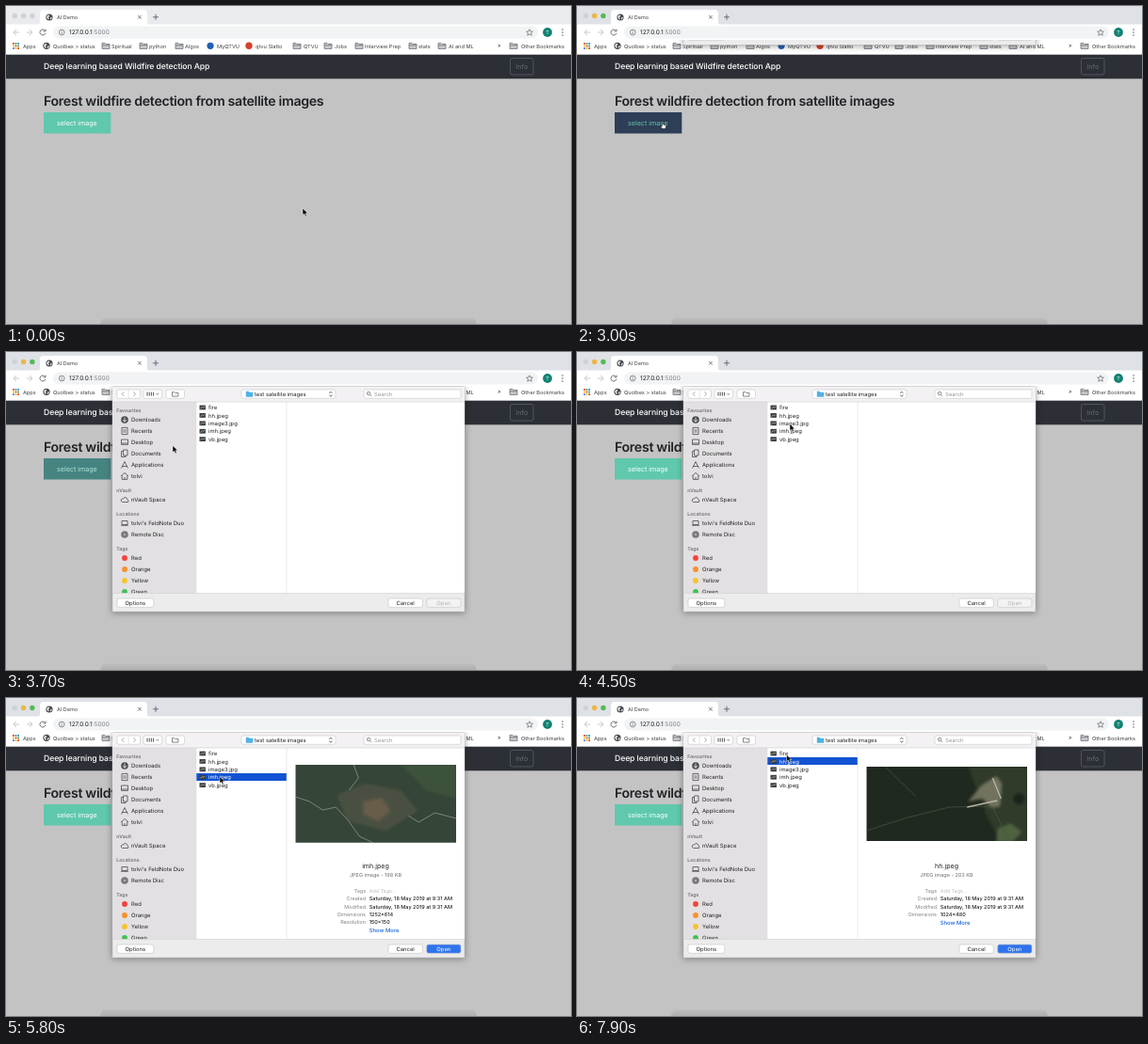
Write an HTML page that moves like this. It is 600 by 338 pixels and loops after 8 s.

```html
<!DOCTYPE html>
<html lang="en">
<head>
<meta charset="utf-8">
<title>Wildfire detection demo</title>
<style>
  html, body { margin: 0; width: 100%; height: 100%; overflow: hidden; background: #c4c3c4; }
  svg { display: block; width: 600px; height: 338px; }
  text { font-family: Inter, Roboto, "Liberation Sans", sans-serif; text-rendering: geometricPrecision; white-space: pre; }
  #sheet { filter: drop-shadow(0 1.5px 3.5px rgba(0, 0, 0, .36)); }
  .soft { filter: blur(1.6px); }
</style>
</head>
<body>
<svg id="stage" viewBox="0 0 600 338"></svg>
<script>
const LOOP = 8000, DARK = '#3c4043', INK = '#222', GREY = '#808080', ICON = '#4c4b4d';

// Drawing helpers, each returning SVG markup
const text = (x, y, s, size, fill = INK, more = '') =>
  `<text x="${x}" y="${y}" font-size="${size}" fill="${fill}" ${more}>${s}</text>`;
const rect = (x, y, w, h, fill, more = '') =>
  `<rect x="${x}" y="${y}" width="${w}" height="${h}" fill="${fill}" ${more}/>`;
const dot = (x, y, r, fill, more = '') => `<circle cx="${x}" cy="${y}" r="${r}" fill="${fill}" ${more}/>`;
const line = (d, color, w = .8, more = '') =>
  `<path d="${d}" fill="none" stroke="${color}" stroke-width="${w}" ${more}/>`;
const shape = (d, fill, more = '') => `<path d="${d}" fill="${fill}" ${more}/>`;
const group = (id, body, more = '') => `<g id="${id}" ${more}>${body}</g>`;
const MID = 'text-anchor="middle"', END = 'text-anchor="end"';

const folder = (x, y, c = '#6b6f74') =>
  shape(`M${x} ${y - 3}h3l1 1h4v5h-8z`, '#c9cbce') +
  line(`M${x} ${y - 3}h3l1 1h4v5h-8zM${x} ${y - .6}h8`, c, .8);
const globe = (x, y) => dot(x, y, 3.6, '#46494d') +
  shape(`M${x - 2.6} ${y - 1.4}l2-1.2 1 1.4-1.6 1.2 1 1.2-.8 1.4-1.6-2zM${x + 1} ${y + .4}l1.8-.6-.4 1.8-1.4 1z`, '#e8eaed');

function browser() {
  const bookmarks = [
    [18, 'Apps'], [50, 'Quolbex &gt; status'], [112, 'Spiritual', 102], [152, 'python', 142], [190, 'Algos', 180],
    [224, 'MyQTVU'], [265, 'qtvu Slatto'], [316, 'QTVU', 305], [349, 'Jobs', 338],
    [381, 'Interview Prep', 371], [438, 'stats', 428], [470, 'AI and ML', 459], [547, 'Other Bookmarks', 535]];
  const colors = ['#ea4335', '#34a853', '#4285f4', '#fbbc05'];
  let s = `<rect id="strip" width="600" height="20"/>`;
  for (let i = 0; i < 3; i++) s += `<circle class="light" cx="${9.3 + i * 9.3}" cy="10.5" r="2.7"/>`;
  s += shape('M33 20q3 0 3-3V8q0-4 4-4h106q4 0 4 4v9q0 3 3 3z', '#fff') + globe(46, 12) +
    text(54, 14, 'AI Demo', 5.5, DARK) +
    line('M140 10l3.6 3.6m0-3.6l-3.6 3.6', '#5f6368', .8) + line('M156 11.8h6m-3-3v6', '#5f6368', .9);
  s += rect(0, 19.5, 600, 32, '#fff') + rect(50, 21.5, 515, 13, '#f1f3f4', 'rx="6.5"') +
    line('M14 28H8m3-3l-3 3 3 3M22 28h6m-3-3l3 3-3 3', '#c1c4c8', .9) +
    line('M41.4 26.2a3 3 0 1 0 .5 2.6M42 24.6v2.3h-2.4', '#5f6368', .9) +
    line('M59.2 27.6v2.2m0-3.8v.8M56.3 28a2.9 2.9 0 1 0 5.8 0a2.9 2.9 0 1 0-5.8 0', '#5f6368', .7) +
    text(67, 30.2, '127.0.0.1<tspan fill="#80868b">:5000</tspan>', 6.5) +
    line('M556 24.8l1 2.2 2.4.2-1.8 1.6.6 2.4-2.2-1.3-2.2 1.3.6-2.4-1.8-1.6 2.4-.2z', '#5f6368', .7) +
    dot(575, 28, 4.9, '#128272') + text(575, 30, 'T', 5.4, '#fff', MID);
  for (const y of [25, 28, 31]) s += dot(591, y, .8, '#5f6368');
  for (let i = 0; i < 9; i++) s += rect(7 + i % 3 * 2.6, 39 + (i / 3 | 0) * 2.6, 1.8, 1.8, colors[i % 4]);
  s += globe(43, 42.3) + dot(217, 42.3, 3.6, '#1f62b5') + dot(258, 42.3, 3.7, '#d6402c');
  for (const [x, name, icon] of bookmarks)
    s += text(x, 44.5, name, 5.6, DARK) + (icon ? folder(icon, 42.4) : '');
  return s + text(522, 44.3, '»', 6, DARK);
}

function page() {
  return rect(0, 51, 600, 287, '#c4c3c4') +
    text(40, 67.4, 'Deep learning based Wildfire detection App', 8.65, '#fff', 'font-weight="500" letter-spacing="-.08"') +
    rect(535.5, 55.5, 24.5, 17.5, 'none', 'rx="2" stroke="#596067" stroke-width=".8"') +
    text(547.8, 67, 'Info', 7.2, '#656c73', MID) +
    text(40, 106.3, 'Forest wildfire detection from satellite images', 14.15, '#1f2225', 'font-weight="600" letter-spacing="-.3"') +
    '<rect id="button" x="40" y="113" width="71.3" height="22.5"/>' +
    text(54, 127.2, 'select image', 7.15, '#fff', 'id="label"') +
    shape('M100 338q1-7 8-7h384q7 0 8 7z', 'url(#dock)');
}

function sidebar() {
  const heads = [['Favourites', 63.5], ['nVault', 148.8], ['Locations', 173.5], ['Tags', 210.5]];
  const items = [['Downloads', 72], ['Recents', 84], ['Desktop', 96], ['Documents', 108], ['Applications', 120],
    ['tolvi', 132], ['nVault Space', 157], ["tolvi's FeldNote Duo", 182], ['Remote Disc', 194],
    ['Red', 219, '#f5413a'], ['Orange', 231, '#f7902a'], ['Yellow', 243, '#f6c32f'], ['Green', 255, '#41c150']];
  const icons = [
    'M126 69.6v4.6m-2-2l2 2 2-2', 'M123 80.4h6v7.2h-6zM124.4 83h3.2m-3.2 2h3.2', 'M122.5 93h7v5.4h-7zM122.5 97h7',
    'M124.5 104h4.5v6h-4.5zM124.5 105.5h-2v6h4.5V110', 'M126 116.5l-3.5 7m3.5-7l3.5 7m-6.5-2h6',
    'M122 132l4-3.6 4 3.6M123.2 131.4v4h5.6v-4M126 135.4v-2.4',
    'M123.5 159.5q-2-1-1-2.8 1-1 2-.6 1-2.4 3.2-1.2 1.2.6 1.2 2 2 1 .6 2.6z',
    'M123 179.5h6v4h-6zM122 184.3h8', 'M125 194h2'];
  let s = rect(113, 53, 89, 203.5, '#e2e0e2');
  for (const [name, y] of heads) s += text(117.3, y, name, 5.15, '#737173', 'font-weight="600"');
  items.forEach(([name, y, tag], i) => {
    s += text(133, y + 2.1, name, 5.9);
    if (tag) return s += dot(126, y, 2.9, tag);
    const filled = i == 0 || i == 8;
    if (filled) s += dot(126, y, 3.8, i ? '#7b797b' : ICON);
    s += line(icons[i], filled ? '#fff' : ICON, .8);
  });
  return s;
}

const files = ['fire', 'hh.jpeg', 'image3.jpg', 'imh.jpeg', 'vb.jpeg'];
const rowY = i => 59 + i * 8.4;

function preview(id, name, size, [x, y, w, h], photo, facts) {
  let s = `<svg x="${x}" y="${y}" width="${w}" height="${h}">${photo}</svg>` +
    text(392.5, 180.6, name, 7.1, INK, MID) +
    text(392.5, 190, `JPEG image - ${size} KB`, 5.5, GREY, MID + ' font-weight="500"') +
    text(382, 207.2, 'Tags', 5.4, GREY, END) + text(385.7, 207.2, 'Add Tags…', 5.4, '#bdbdbd');
  facts.forEach(([key, value], i) => {
    const y = 215.4 + i * 8.3;
    s += text(382, y, key, 5.45, GREY, END) + text(385.7, y, value, 5.53, INK, 'font-weight="500"');
  });
  s += text(385.7, 215.7 + facts.length * 8.3, 'Show More', 5.9, '#1462d6', 'font-weight="500"');
  return group(id, s, 'class="preview" clip-path="url(#pane)"');
}

// Soft satellite views: a ground colour with a few blurred patches
const view = (ground, patches) => rect(0, 0, 171, 97, ground) + `<g class="soft">${patches}</g>`;
const photos = {
  image3: view('#2e3834',
    shape('M0 0h62l-24 24-38 22z', '#3a4543') + shape('M84 97l64-55v55z', '#3f4236') +
    shape('M0 42L41 27 84 7l28-5 18 4 9 12-18 16-40 21-26 20-18 22H0z', 'url(#smoke)') +
    shape('M6 62l46-26 42-18-28 26-42 36z', '#c0c1bf', 'opacity=".5"') +
    line('M85 47l9-10 3-14 10-6m-9 20l17-9 8-11', '#cf6248', 1.6)),
  imh: view('#354538',
    shape('M44 32l30-12 38 7 18 22-34 21-40-10z', '#545646', 'opacity=".7"') +
    shape('M72 39l20-4 9 14-13 11-16-8z', '#80684f', 'opacity=".55"') +
    shape('M112 0h59v36l-31-8z', '#3d523b')) +
    line('M0 34l15 5 14 9 14-3 13 14 12 17 15 7M62 0l5 14-10 13M171 57l-23-6-17 10-11-7', '#8f978b', .8),
  hh: view('#20291f',
    shape('M108 0h63v80h-28l-15-28z', '#303b2a') +
    shape('M122 20l16-10 6 8-2 24-9 2-9-10-16 3z', '#87866f', 'opacity=".75"') +
    shape('M139 66l14-6 12 9-10 11h-17z', '#4e6240') + dot(162, 34, 6, '#1b241b')) +
    line('M0 68l44-14 44-11 46-1M134 42l18 38M20 0l32 31', '#4c5645', .7) +
    line('M107 43l32-7m-5-24l9 22', '#b9b8a4', 1.3),
};

function sheet() {
  const pill = (x, w, fill = '#fff') =>
    rect(x, 40, w, 9.3, fill, 'rx="2" stroke="#c9c7c9" stroke-width=".6"');
  const saved = date => [['Created', date], ['Modified', date]];
  const may = saved('Saturday, 18 May 2019 at 9:31 AM');
  let s = rect(113, 37, 374, 239, '#ececec', 'stroke="#b5b3b5" stroke-width=".5"') +
    rect(113, 37, 374, 16, '#f3f1f3') + pill(118, 24.5) + pill(146, 19.5) + pill(170, 19.5) + pill(250, 100) + pill(380, 103) +
    line('M130.2 40v9.3', '#d5d3d5', .6) +
    line('M125.2 42.4l-2 2.2 2 2.2M135.5 42.4l2 2.2-2 2.2', '#929092', .8) +
    line('M150 42.6v4m2.2-4v4m2.2-4v4m2.2-4v4', '#555', 1) + line('M159.4 44l1.3 1.4 1.3-1.4', '#555', .7) +
    line('M176.5 42.6h2.4l.8.8h3.2v3.7h-6.4z', '#555', .7) +
    shape('M254.8 41.7h2.8l.8 1h3.8v5h-7.4z', '#4fb1e6') +
    text(264, 46.8, 'test satellite images', 5.85) +
    line('M343.3 43.8l1.5-1.7 1.5 1.7m-3 1.8l1.5 1.7 1.5-1.7', '#444', .8) +
    line('M383.3 44a1.8 1.8 0 1 0 3.6 0a1.8 1.8 0 1 0-3.6 0m3.2 1.4l1.7 1.7', '#666', .7) +
    text(391, 46.8, 'Search', 5.9, '#999');
  s += group('side', sidebar(), 'clip-path="url(#pane)"') + rect(202, 53, 285, 203.5, '#fff') +
    line('M202 53v203.5M298 53v203.5', '#dedcde', .6) + line('M113 53h374M113 256.5h374', '#d0ced0', .6);
  s += '<rect id="row" x="202.3" width="95.5" height="8" fill="#1153d2"/>';
  files.forEach((name, i) => {
    const y = rowY(i);
    s += rect(205.5, y - 2.4, 6.4, 4.8, '#3a3f3c') + line(`M206.5 ${y + 1}l2-1.5 1.4.7 1.3-1.4`, '#c7cac7', .7) +
      text(215, y + 2.1, name, 5.9, INK, 'class="file"');
  });
  s += preview('p2', 'image3.jpg', 124, [319, 64, 147.5, 97], photos.image3, [
      ['Created', 'Tuesday, 30 April 2019 at 7:01 PM'], ['Modified', 'Sunday, 21 April 2019 at 10:32 PM'],
      ['Last opened', 'Sunday, 5 May 2019 at 11:10 PM'], ['Dimensions', '750×500'], ['Resolution', '72×72']]) +
    preview('p3', 'imh.jpeg', 198, [307.3, 71, 170.7, 82.8], photos.imh,
      [...may, ['Dimensions', '1252×614'], ['Resolution', '150×150']]) +
    preview('p1', 'hh.jpeg', 203, [307.3, 73, 170.7, 79], photos.hh, [...may, ['Dimensions', '1024×480']]);
  for (const [name, x, w] of [['Options', 118, 38.8], ['Cancel', 406, 36.3], ['Open', 446.7, 36.3]])
    s += rect(x, 262, w, 9.3, '#fff', `id="b${name}" rx="2" stroke="#c4c2c4" stroke-width=".6"`) +
      text(x + w / 2, 268.8, name, 5.9, INK, `${MID} id="t${name}"`);
  return s;
}

const $ = id => document.getElementById(id);
$('stage').innerHTML = `<defs>
  <clipPath id="below"><rect x="90" y="36" width="420" height="302"/></clipPath>
  <clipPath id="pane"><rect x="113" y="53" width="374" height="203.2"/></clipPath>
  <linearGradient id="dock" x2="0" y2="1"><stop stop-color="#bfbebf"/><stop offset="1" stop-color="#b1b0b1"/></linearGradient>
  <linearGradient id="smoke" x1="1" y1="0" x2="0" y2="1"><stop stop-color="#8c8480"/><stop offset=".45" stop-color="#aaaaa8"/><stop offset="1" stop-color="#6c7270"/></linearGradient>
  </defs>` + page() + browser() + rect(0, 51.5, 600, 25.8, '#2c2f35', 'id="navbar"') +
  `<g id="sheetClip" clip-path="url(#below)">${group('sheet', sheet())}</g>` +
  group('arrow', shape('M0 0v7.2l1.7-1.5 1.2 2.6 1.3-.5-1.1-2.6h2.3z', '#000', 'stroke="#fff" stroke-width=".5"')) +
  group('hand', shape('M-.7.2q.8-.8 1.4 0v2.3l2.4.6q.8.3.6 1.2L3 7H-.3l-2-2.5q0-1 1.6 0z', '#fff', 'stroke="#111" stroke-width=".6"'));
// The bar lies beneath its own title and button
$('stage').insertBefore($('navbar'), $('stage').querySelector('text'));

const clamp = v => Math.max(0, Math.min(1, v));
const ease = v => v * v * (3 - 2 * v);
const ramp = (t, a, b) => ease(clamp((t - a) / (b - a)));
const mix = (a, b, p) => `rgb(${a.map((v, i) => Math.round(v + (b[i] - v) * p))})`;
const MINT = [95, 200, 173], NAVY = [45, 62, 86], WHITE = [255, 255, 255];

// Pointer stops: time, x, y
const stops = [[0, 315, 215], [1000, 315, 215], [1500, 95, 116], [1900, 95, 116], [2200, 91, 123.5], [3250, 91, 123.5],
  [3700, 177, 99.5], [4500, 226, 76.5], [5300, 226, 76.5], [5700, 227, 83.5], [6300, 227, 83.5], [6800, 224, 69],
  [7000, 224, 66.5], [7500, 224, 66.5], [7900, 222.5, 60.3], [8000, 222.5, 60]];
const lights = ['#fc605c', '#ecb646', '#55b855'], OFF = '#d0d1d4';
// Selected row from a given time on
const picks = [[7200, 1], [5800, 3], [4700, 2], [0, -1]];

const show = (el, on) => el.style.display = on ? '' : 'none';

function draw(t) {
  const i = stops.findIndex(s => s[0] > t), [t0, x0, y0] = stops[i - 1], [t1, x1, y1] = stops[i];
  const p = ramp(t, t0, t1), at = `translate(${x0 + (x1 - x0) * p} ${y0 + (y1 - y0) * p})`;
  const hand = t >= 2000 && t < 3250;
  for (const id of ['arrow', 'hand']) $(id).setAttribute('transform', at);
  show($('arrow'), !hand);
  show($('hand'), hand);

  // The close light goes out while the sheet is open
  const active = t >= 1800, sheetOpen = t >= 2980;
  $('strip').setAttribute('fill', active ? '#dee1e6' : '#e9ebee');
  document.querySelectorAll('.light').forEach((el, n) =>
    el.setAttribute('fill', active && (n || !sheetOpen) ? lights[n] : OFF));

  const hover = ramp(t, 1950, 2150) - ramp(t, 3600, 3800);
  $('button').setAttribute('fill', mix(MINT, NAVY, hover));
  $('label').setAttribute('fill', mix(WHITE, MINT, hover));

  show($('sheetClip'), sheetOpen);
  $('sheet').setAttribute('transform', `translate(0 ${-240 * (1 - ramp(t, 2970, 3320))})`);

  const pick = picks.find(k => t >= k[0])[1], open = pick >= 0;
  show($('row'), open);
  $('row').setAttribute('y', Math.round(rowY(pick) - 4.2));
  document.querySelectorAll('.file').forEach((el, n) => el.setAttribute('fill', n == pick ? '#fff' : INK));
  document.querySelectorAll('.preview').forEach(el => show(el, el.id == 'p' + pick));
  $('bOpen').setAttribute('fill', open ? '#2f73ee' : '#f3f3f3');
  $('tOpen').setAttribute('fill', open ? '#fff' : '#b5b5b5');
}

function tick() {
  draw(performance.now() % LOOP);
  requestAnimationFrame(tick);
}
tick();
</script>
</body>
</html>
```
